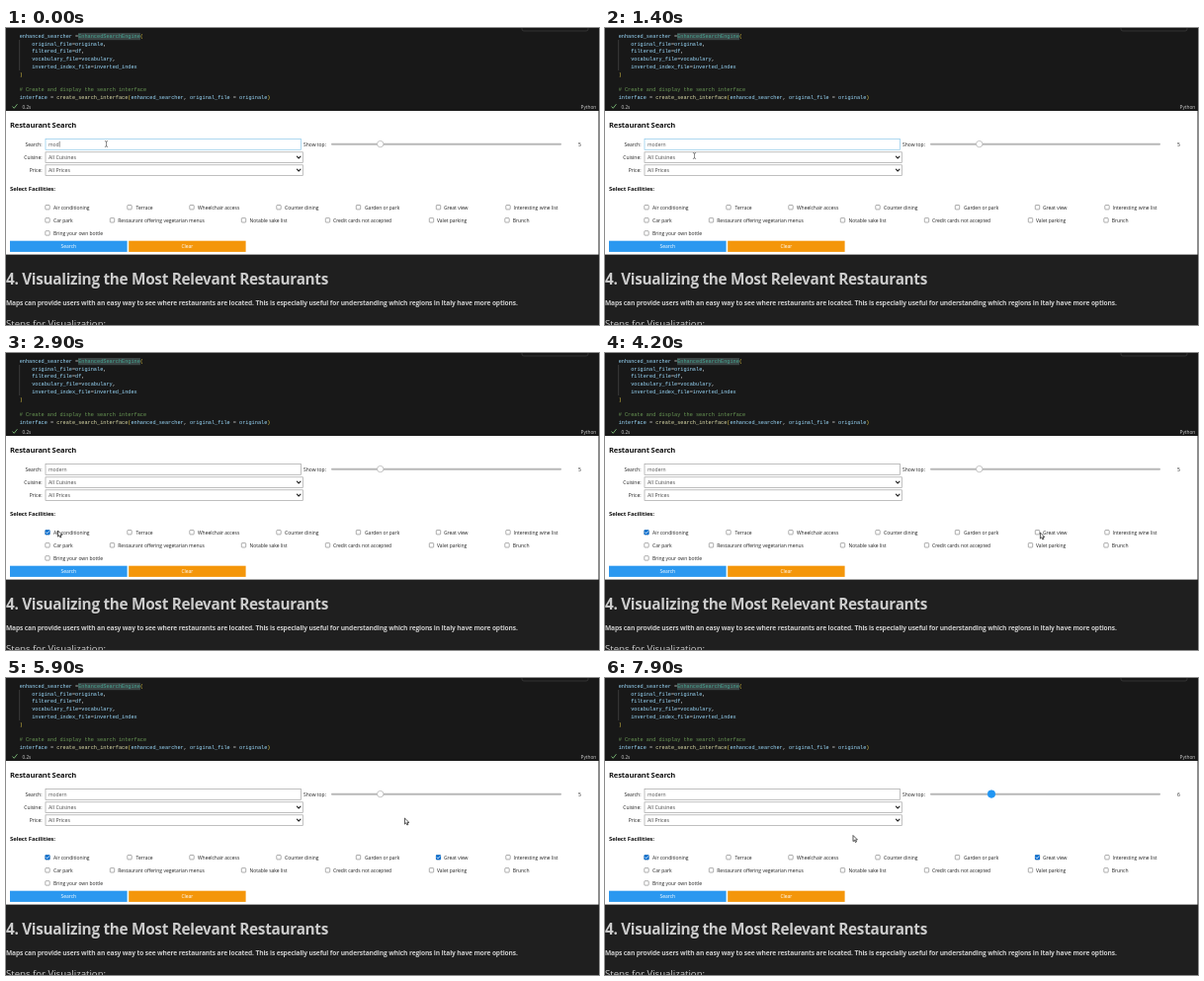
These frames come from a looping animation (600x301 px, 8000 ms). An HTML page:

```html
<!DOCTYPE html>
<html lang="en">
<head>
<meta charset="utf-8">
<title>Restaurant Search</title>
<style>
  html, body { margin: 0; width: 100%; height: 100%; overflow: hidden; background: #1f1f1f; }
  svg { display: block; width: 100vw; height: 100vh; }
  text { font: 4.98px "Open Sans", "Noto Sans", sans-serif; fill: #222; white-space: pre; }
  .code { font: 5.23px "Liberation Mono", "Noto Sans Mono", monospace; fill: #d4d4d4; }
  .v { fill: #9cdcfe; }
  .f { fill: #dcdcaa; }
  .c { fill: #46a592; }
  .n { fill: #6a9955; }
  .p { fill: #e8cf4a; }
  .b { font-weight: 700; letter-spacing: -.02em; }
  .line { fill: none; stroke-linecap: round; stroke-linejoin: round; }
</style>
</head>
<body>
<svg id="stage" viewBox="0 0 600 301" preserveAspectRatio="none"></svg>
<script>
const stage = document.getElementById('stage');
const $ = id => document.getElementById(id);

const text = (x, y, s, size = 4.98, fill = '#222', extra = '') =>
  `<text x="${x}" y="${y}" style="font-size:${size}px;fill:${fill}" ${extra}>${s}</text>`;
const rect = (x, y, w, h, fill, extra = '') =>
  `<rect x="${x}" y="${y}" width="${w}" height="${h}" fill="${fill}" ${extra}/>`;
const right = 'text-anchor="end"', middle = 'text-anchor="middle"', bold = 'class="b"';

// Code cell: each piece is "class:text" or plain text
const code = [
  ['v:enhanced_searcher', ' =', 'c:EnhancedSearchEngine', 'p:('],
  ['v:    original_file', '=', 'v:originale', ','],
  ['v:    filtered_file', '=', 'v:df', ','],
  ['v:    vocabulary_file', '=', 'v:vocabulary', ','],
  ['v:    inverted_index_file', '=', 'v:inverted_index'],
  ['p:)'],
  [],
  ['n:# Create and display the search interface'],
  ['v:interface', ' = ', 'f:create_search_interface', 'p:(', 'v:enhanced_searcher', ', ',
   'v:original_file', ' = ', 'v:originale', 'p:)']
];
const piece = s => s[1] === ':' ? `<tspan class="${s[0]}">${s.slice(2)}</tspan>` : s;
const codeLines = code.map((l, i) =>
  `<text class="code" x="13.7" y="${9.9 + i * 7.75}">${l.map(piece).join('')}</text>`).join('');

// Facility rows: [box centre, label x, label]
const rows = [
  [[42, 48, 'Air conditioning'], [125, 131.5, 'Terrace'], [188, 194, 'Wheelchair access'],
   [276, 282, 'Counter dining'], [356.5, 363, 'Garden or park'], [437.5, 443, 'Great view'],
   [508, 513.5, 'Interesting wine list']],
  [[42, 48, 'Car park'], [107.5, 113.3, 'Restaurant offering vegetarian menus'],
   [240.5, 246.5, 'Notable sake list'], [325.5, 331, 'Credit cards not accepted'],
   [430.5, 436, 'Valet parking'], [507, 512.7, 'Brunch']],
  [[42, 48, 'Bring your own bottle']]
];
const facilities = rows.map((row, r) => row.map(([cx, x, s]) =>
  rect(cx - 2.2, 179.5 + r * 13.1, 4.4, 4.4, '#fff', 'rx=".7" stroke="#767676" stroke-width=".6"') +
  text(x, 184.4 + r * 13, s)).join('')).join('');

const tick = (id, cx) => `<g id="${id}">${rect(cx - 2.5, 179.2, 5, 5, '#0b6fd0', 'rx=".7"')}
  <path class="line" stroke="#fff" stroke-width=".8" d="M${cx - 1.4} 181.8l1 1.1 1.9-2.2"/></g>`;

const select = (y, s) =>
  rect(40, y, 260.3, 10.8, '#fff', 'stroke="#a4a4a4" stroke-width=".7"') + text(43, y + 7.2, s, 5.3, '#444') +
  `<path class="line" stroke="#222" stroke-width="1.1" d="M294.4 ${y + 4.4}l1.8 1.8 1.8-1.8"/>`;

stage.innerHTML =
  rect(0, 0, 600, 84, '#181818') +
  rect(522, -5, 67, 8, 'none', 'rx="2" stroke="#3c3c3c" stroke-width=".8"') +
  rect(73, 5, 63, 7.2, '#3a4444') + rect(13.5, 12, .6, 31, '#505050') + codeLines +
  '<path class="line" stroke="#89d185" stroke-width=".8" d="M6.8 79.8l1.4 1.5 3-3.8"/>' +
  text(16.5, 81.6, '0.2s', 4.7, '#ccc') + text(597.3, 81.6, 'Python', 4.8, '#ccc', right) +

  rect(0, 84, 599.5, 145.6, '#fff') +
  text(4, 101.4, 'Restaurant Search', 7.6, '#111', bold) +
  text(36.5, 119.6, 'Search:', 4.98, '#222', right) +
  text(36.5, 132.8, 'Cuisine:', 4.98, '#222', right) +
  text(36.5, 145.8, 'Price:', 4.98, '#222', right) +
  rect(40, 112.5, 258.5, 10.8, '#fff', 'id="field" stroke-width=".7"') +
  text(43, 119.6, '', 4.98, '#555', 'id="query"') +
  rect(0, 114.8, .5, 5.8, '#333', 'id="caret"') +
  select(125.8, 'All Cuisines') + select(138.8, 'All Prices') +
  text(301, 119.6, 'Show top:') +
  rect(329, 116.7, 233, 2, '#b8b8b8', 'rx="1"') +
  '<circle id="thumb" cy="117.6"/>' +
  text(580.5, 119.7, '5', 4.98, '#222', 'id="count" ' + middle) +
  text(4, 165.4, 'Select Facilities:', 6.05, '#111', bold) +
  facilities + tick('air', 42) + tick('view', 437.5) +
  rect(4, 215.7, 118.6, 11.2, '#2b98f0') + rect(124.2, 215.7, 118.4, 11.2, '#f4960a') +
  text(63.3, 223, 'Search', 4.98, '#fff', middle) + text(183.4, 223, 'Clear', 4.98, '#fff', middle) +

  text(0, 259.6, '4. Visualizing the Most Relevant Restaurants', 15.35, '#ccc', bold) +
  text(0, 281.2, 'Maps can provide users with an easy way to see where restaurants are located. ' +
    'This is especially useful for understanding which regions in Italy have more options.', 6.64, '#ccc', bold) +
  text(0, 303.4, 'Steps for Visualization:', 9.6, '#ccc') +

  `<path id="beam" class="line" stroke="#444" stroke-width=".6"
    d="M-1.2-2.9Q0-2.9 0-2.2Q0-2.9 1.2-2.9M0-2.2V2.2M-1.2 2.9Q0 2.9 0 2.2Q0 2.9 1.2 2.9"/>
  <path id="arrow" fill="#fff" stroke="#111" stroke-width=".7" stroke-linejoin="round"
    d="M0 0V6.1L1.4 4.8 2.4 7 3.5 6.5 2.5 4.4H4.4Z"/>`;

// Pointer path: time, x, y
const path = [
  [0, 101.5, 117.5], [900, 101.5, 117.5], [1400, 90.5, 129.5], [1900, 44, 179], [2600, 43, 181],
  [2900, 52.5, 180], [3600, 381, 181], [4000, 440, 182], [4500, 441, 182], [4700, 439, 181],
  [5200, 423.5, 163], [5600, 421, 160], [6300, 380, 118], [6600, 382, 119], [6700, 385, 119],
  [6900, 391, 119], [7200, 391, 119], [7800, 254, 158], [8000, 248, 161]
];

function pointer(t) {
  const i = path.findIndex(p => p[0] > t), [a, b] = [path[i - 1], path[i]];
  const k = (t - a[0]) / (b[0] - a[0]);
  return [a[1] + (b[1] - a[1]) * k, a[2] + (b[2] - a[2]) * k];
}

const show = (id, on) => $(id).setAttribute('visibility', on ? 'visible' : 'hidden');
const set = (id, attrs) => Object.entries(attrs).forEach(([k, v]) => $(id).setAttribute(k, v));

function draw(t) {
  const focused = t < 2300, dragging = t >= 6400, value = t < 6800 ? 5 : 6;
  const typed = 3 + [200, 500, 700].filter(k => t >= k).length;
  $('query').textContent = 'modern'.slice(0, typed);
  set('caret', { x: 43.2 + $('query').getComputedTextLength() });
  show('caret', focused && (t < 1200 || t >= 1700 && t < 2200));
  set('field', { stroke: focused ? '#8cc8ea' : '#a4a4a4' });

  show('air', t >= 2400);
  show('view', t >= 4400);

  $('count').textContent = value;
  set('thumb', {
    cx: 329.7 + (value - 1) / 19 * 233, r: dragging ? 3.8 : 3.2,
    fill: dragging ? '#2196f3' : '#fff', stroke: dragging ? '#2196f3' : '#a0a0a0', 'stroke-width': .6
  });

  const at = `translate(${pointer(t)})`;
  set('beam', { transform: at });
  set('arrow', { transform: at });
  show('beam', t < 1500);
  show('arrow', t >= 1500);
}

// Ten steps a second
function loop() {
  draw(Math.floor(performance.now() % 8000 / 100) * 100);
  requestAnimationFrame(loop);
}
loop();
</script>
</body>
</html>
```
